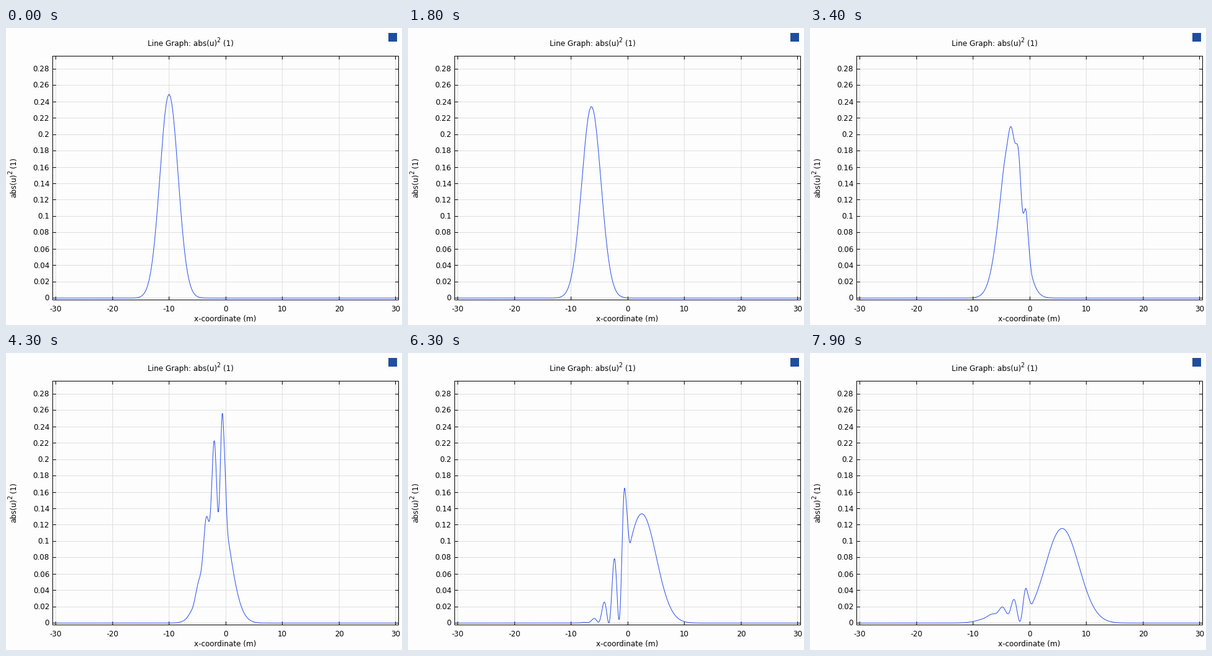
These frames come from a looping animation (640x480 px, 8000 ms). A matplotlib script:

```python
import math
import numpy as np
import matplotlib.pyplot as plt
from matplotlib.animation import FuncAnimation
from matplotlib.patches import Rectangle

plt.rcParams["font.family"] = "DejaVu Sans"
W, H, DPI = 640, 480, 80
PT = 72 / DPI
FRAMES, STEP = 80, 0.1

# Wave packet hitting a thin square barrier (hbar = m = 1), lightly damped
SIGMA, X0, K0 = 1.6, -10, 2
HEIGHT, HALF_WIDTH = 1.0, 0.5
DAMPING = 0.0018
N, SUB = 1200, 40


def solve():
    """Split-step Fourier solution: x grid and |u|^2 at every frame."""
    dx = 60 / N
    x = -30 + dx * np.arange(N)
    k = 2 * np.pi * np.fft.fftfreq(N, dx)
    dt = STEP / SUB
    barrier = HEIGHT * np.clip((HALF_WIDTH - abs(x)) / dx + 0.5, 0, 1)
    half_kick = np.exp(-0.5j * dt * barrier)
    drift = np.exp(-0.5j * dt * k**2 - 0.5 * dt * DAMPING)
    u = (2 * np.pi * SIGMA**2) ** -0.25 * np.exp(
        -((x - X0) ** 2) / (4 * SIGMA**2) + 1j * K0 * x)
    out = []
    for _ in range(FRAMES):
        out.append(abs(u) ** 2)
        for _ in range(SUB):
            u = half_kick * np.fft.ifft(drift * np.fft.fft(half_kick * u))
    return x, np.array(out)


def px(x):
    return 80.5 + 9.15 * (x + 30)


def py(v):
    return 436.5 - 1321.4 * v


def center(p):
    """Middle of the pixel that holds p."""
    return math.floor(p) + 0.5


fig = plt.figure(figsize=(W / DPI, H / DPI), dpi=DPI, facecolor="#fdfdfd")
ax = fig.add_axes([0, 0, 1, 1])
ax.set(xlim=(0, W), ylim=(H, 0))
ax.axis("off")

L, T, R, B = 75.5, 45.5, 634.5, 439.5


def rule(xs, ys, color="black", z=3):
    ax.plot(xs, ys, color=color, lw=PT, zorder=z, snap=False,
            solid_capstyle="projecting", solid_joinstyle="miter")


def label(x, y, s, size=12, **kw):
    ax.text(x, y, s, fontsize=size * PT, va="baseline", **kw)


for v in range(-30, 31, 10):
    x = center(px(v))
    rule([x, x], [T, B], "#dfdfdf", 1)
    rule([x, x], [T, T + 5])
    rule([x, x], [B, B - 5])
    label(x, 458, str(v), ha="center")

for i in range(15):
    y = center(py(i * 0.02))
    rule([L, R], [y, y], "#dfdfdf", 1)
    rule([L, L + 5], [y, y])
    rule([R, R - 5], [y, y])
    label(70.2, y + 4, f"{i * 0.02:g}", ha="right")

rule([L, R, R, L, L], [T, T, B, B, T])

label(229, 29, "Line Graph: abs(u)")
label(340.6, 23.3, "2", 9.5)
label(351.5, 29, "(1)")
label(304, 474, "x-coordinate (m)")

upright = dict(rotation=90, rotation_mode="anchor")
label(16, 274.5, "abs(u)", **upright)
label(10.3, 236.5, "2", 9.5, **upright)
label(16, 225.5, "(1)", **upright)

ax.add_patch(Rectangle((618, 8), 14, 14, color="#1f4e9e", lw=0))

grid, density = solve()
# Coarse plot points, finer close to the barrier
pick = (np.arange(N) % 5 == 0) | ((grid > -6) & (grid < 0.6))
xs = np.append(px(grid[pick]), px(30))
curve, = ax.plot([], [], color="#2a50f0", lw=PT, zorder=4, snap=False)


def update(i):
    curve.set_data(xs, py(np.append(density[i][pick], 0)))
    return curve,


anim = FuncAnimation(fig, update, frames=FRAMES, interval=100, repeat=True,
                     repeat_delay=0, blit=False)
plt.show()
```
